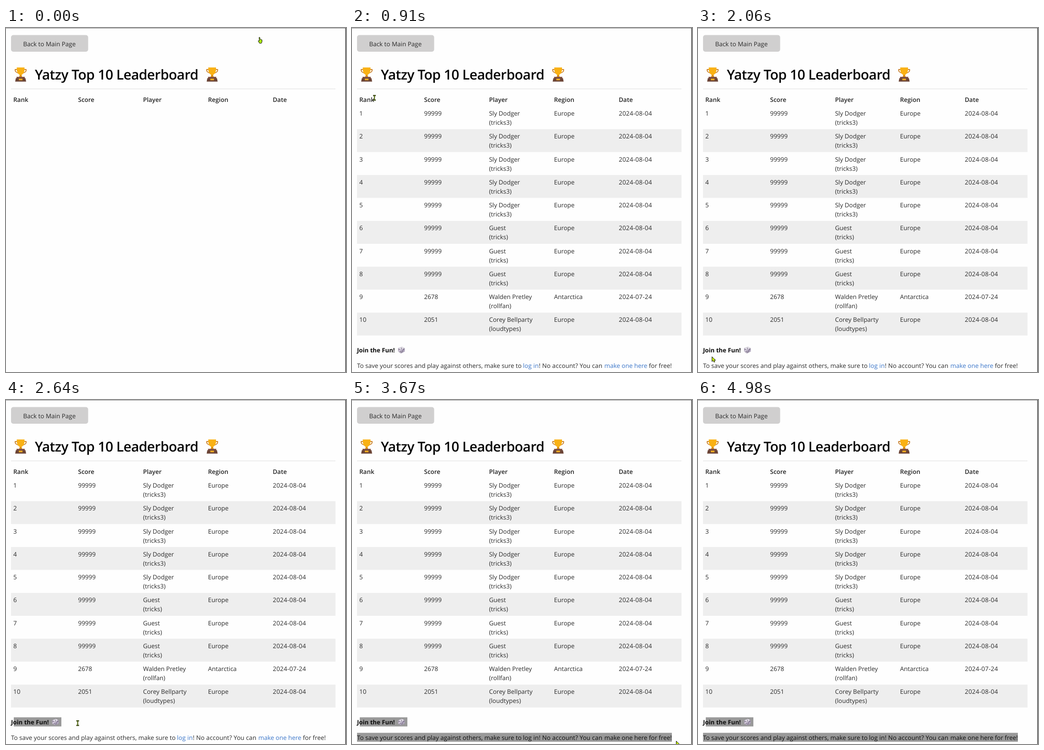
Recreate the animation shown at these times as an HTML page. Size 743 by 754 pixels, loop 5450 ms.

```html
<!DOCTYPE html>
<html lang="en">
<head>
<meta charset="utf-8">
<title>Leaderboard</title>
<style>
  html, body { margin: 0; width: 100%; height: 100%; overflow: hidden; background: #fefefe; }
  svg { display: block; width: 743px; height: 754px; }
  text { font: 13.45px "Open Sans", "Noto Sans", sans-serif; fill: #2b2b2b; white-space: pre; text-rendering: geometricPrecision; }
  .head { font-weight: 600; fill: #222; }
  .date { letter-spacing: .25px; }
  .loose { letter-spacing: .11px; }
  .title { font-size: 30px; font-weight: 600; letter-spacing: -.57px; fill: #050505; }
  .join { font-size: 13.2px; font-weight: 700; fill: #0a0a0a; }
  .link { fill: #3b76c9; }
  .picked text, .picked .link { fill: #0d0d0d; }
</style>
</head>
<body>
<svg viewBox="0 0 743 754">
  <defs>
    <g id="trophy">
      <path d="M6 5H2Q1 10.500 9 13M22 5H26Q27 10.500 19 13" fill="none" stroke="#c9802a" stroke-width="1.800"/>
      <path d="M5.500 .5H22.500Q23.500 13 16 17V22H12V17Q4.500 13 5.500 .5Z" fill="#f9b114"/>
      <path d="M12 17H16L17.500 22H10.500Z" fill="#dc8f12"/>
      <path d="M5 21H23V25H5Z" fill="#825243"/>
      <path d="M3.500 24H24.500L26 31.500H2Z" fill="#6b4436"/>
      <path d="M10 25H18V28.500H10Z" fill="#f5ad22"/>
    </g>
    <g id="die" stroke="#8f8798" stroke-width=".5">
      <path d="M1 3L9 0 15 3 7 6Z" fill="#f4f0f8"/>
      <path d="M1 3L7 6V14L1 10Z" fill="#d4cbdc"/>
      <path d="M7 6L15 3V10L7 14Z" fill="#b9afc6"/>
      <g fill="#43394f" stroke="none">
        <ellipse cx="8" cy="3" rx="1.500" ry=".8"/>
        <circle cx="2.800" cy="6" r=".9"/><circle cx="5.200" cy="10.500" r=".9"/>
        <circle cx="9" cy="11" r=".9"/><circle cx="11" cy="8.500" r=".9"/><circle cx="13" cy="5.500" r=".9"/>
      </g>
    </g>
    <g id="line">
      <text x="11" y="745">To save your scores and play against others, make sure to </text>
      <text class="loose" x="373.500" y="745"><tspan class="link">log in</tspan>! No account? You can </text>
      <text x="551.500" y="745"><tspan class="link">make one here</tspan> for free!</text>
    </g>
    <g id="join">
      <text class="join" x="11" y="711">Join the Fun!</text>
      <use href="#die" x="100" y="699"/>
    </g>
    <clipPath id="clip">
      <rect id="clipJoin" x="17" y="695.500" height="20"/>
      <rect id="clipLine" x="11" y="729.500" height="19.500"/>
    </clipPath>
  </defs>

  <rect width="743" height="754" fill="#fefefe"/>
  <rect x="11" y="15.500" width="168.500" height="36.500" rx="5" fill="#d0cfcf"/>
  <text x="37.500" y="39.500">Back to Main Page</text>
  <use href="#trophy" x="18" y="86"/>
  <text class="title" x="63" y="113">Yatzy Top 10 Leaderboard</text>
  <use href="#trophy" x="436.500" y="86"/>
  <path d="M11 133.500H720" stroke="#dedede"/>
  <g id="heads"></g>

  <g id="content">
    <g id="rows"></g>
    <use href="#join"/>
    <use href="#line"/>
    <g class="picked" clip-path="url(#clip)">
      <path d="M11 690H743V754H11Z" fill="#999"/>
      <text class="join" x="11" y="711">Join the Fun!</text>
      <use href="#die" x="100" y="699"/>
      <g id="pickedLine"></g>
    </g>
  </g>

  <path d="M0 .5H743" stroke="#8c8c8c"/>
  <path d="M742.250 0V754" stroke="#484848" stroke-width="1.500"/>

  <g id="panel">
    <rect x="-.5" y="585" width="50" height="146.500" rx="7" fill="#303030" stroke="#777" stroke-width=".6"/>
    <g fill="none" stroke="#ddd" stroke-width="1.200" stroke-linecap="round">
      <path d="M14 603Q20.500 594 27 603M15 596L26 608"/>
      <circle cx="20.500" cy="603" r="2.500"/>
      <rect x="17" y="680" width="9" height="12" rx="2"/>
      <path d="M15 682V691Q15 694 18 694H23"/>
      <circle cx="19" cy="714" r="4.500"/>
      <path d="M22.500 717.500L26.500 721.500"/>
    </g>
    <g fill="#ddd"><circle cx="15" cy="630" r="1.100"/><circle cx="20.500" cy="630" r="1.100"/><circle cx="26" cy="630" r="1.100"/></g>
    <circle cx="20.500" cy="659" r="6.500" fill="#3793dc"/>
  </g>

  <g id="cursor" stroke="#111" stroke-linejoin="round">
    <path id="arrow" d="M.5 .5V11L3 9 5 12.500 7 11.500 5.300 8.200H8.500Z" fill="#c3ee0a"/>
    <path id="hand" d="M-2 .5Q-.5 -.5 0 1.500V4.500L4.500 6V10L3 13.500H-1L-4 8.500 -2.500 7.500 -1.500 8.500Z" fill="#a9e60e"/>
    <g id="beam" fill="none">
      <path d="M-3 -5H3M0 -5V5M-3 5H3" stroke="#3c4a14" stroke-width="2.400"/>
      <path d="M0 -4V4" stroke="#a5c83c" stroke-width=".7"/>
    </g>
  </g>
</svg>
<script>
const $ = id => document.getElementById(id);
const LOOP = 5450;
const COLS = [16, 157.5, 299.5, 441.5, 583];
const cell = (col, y, s, cls = "") => `<text class="${cls}" x="${COLS[col]}" y="${y}">${s}</text>`;

$("heads").innerHTML = ["Rank", "Score", "Player", "Region", "Date"]
  .map((s, i) => cell(i, 161.5, s, "head")).join("");

const players = [
  ...Array(5).fill(["Sly Dodger", "tricks3"]),
  ...Array(3).fill(["Guest", "tricks"]),
  ["Walden Pretley", "rollfan", 2678, "Antarctica", "2024-07-24"],
  ["Corey Bellparty", "loudtypes", 2051]
];

$("rows").innerHTML = players.map(([name, user, score = 99999, region = "Europe", date = "2024-08-04"], i) => {
  const y = 192 + i * 50.27;
  const band = i % 2 ? `<rect x="11" y="${y - 20.6}" width="709" height="50.2" fill="#eee"/>` : "";
  return band + cell(0, y, i + 1) + cell(1, y, score) + cell(2, y, name) +
    cell(2, y + 20, `(${user})`) + cell(3, y, region) + cell(4, y, date, "date");
}).join("");

$("pickedLine").innerHTML = $("line").innerHTML;

// time, x, y of the pointer's hot spot
const PATH = [
  [490, 555, 20], [700, 310, 70], [910, 49, 153], [1090, 253, 278],
  [1240, 253, 278], [1820, 33, 709], [1880, 33, 709], [2060, 30, 720],
  [2300, 18, 708], [2460, 18, 706], [3030, 457, 713], [3090, 509, 719],
  [3580, 707, 746], [3670, 708, 747], [3900, 708, 747], [4140, 686, 710],
  [4290, 631, 692], [4410, 667, 704], [4470, 667, 704], [4920, 603, 544]
];
const PANEL = [[4020, 745], [4140, 713.5], [4290, 713.5], [4410, 745]];
const MOVES = [[550, 1090], [1300, 1820], [1940, 2460], [2520, 3030], [3090, 3580], [3670, 3670], [3960, 4410], [4530, 4980]];

// the picture advances in 60 ms ticks, only while something moves
function snap(t) {
  let out = 0;
  for (const [from, to] of MOVES) {
    if (t >= to) out = to;
    else if (t >= from) out = from + Math.floor((t - from) / 60) * 60;
  }
  return out;
}

function along(keys, t, k) {
  if (t <= keys[0][0]) return keys[0][k];
  for (let i = 1; i < keys.length; i++) {
    const a = keys[i - 1], b = keys[i];
    if (t < b[0]) return a[k] + (b[k] - a[k]) * (t - a[0]) / (b[0] - a[0]);
  }
  return keys[keys.length - 1][k];
}

const show = (id, on) => $(id).setAttribute("display", on ? "inline" : "none");
const clamp = (v, lo, hi) => Math.min(hi, Math.max(lo, v));

function draw(time) {
  const t = snap(time);
  const x = along(PATH, t, 1), y = along(PATH, t, 2);

  show("content", time >= 170);
  $("clipJoin").setAttribute("width", t < 2460 ? 0 : clamp(x - 17, 5, 104));
  $("clipLine").setAttribute("width", t < 3090 ? 0 : t >= 3580 ? 688 : clamp(x * 1.06 - 61, 0, 688));

  const hand = t < 550;
  const beam = (t >= 850 && t < 970) || (t >= 2300 && t < 2820);
  show("cursor", t < 4980);
  show("hand", hand);
  show("beam", beam);
  show("arrow", !hand && !beam);
  $("cursor").setAttribute("transform", `translate(${x} ${y})`);

  show("panel", t > 4020 && t < 4410);
  $("panel").setAttribute("transform", `translate(${along(PANEL, t, 1)} 0)`);
}

const start = performance.now();
function tick() {
  draw((performance.now() - start) % LOOP);
  requestAnimationFrame(tick);
}
tick();
</script>
</body>
</html>
```
